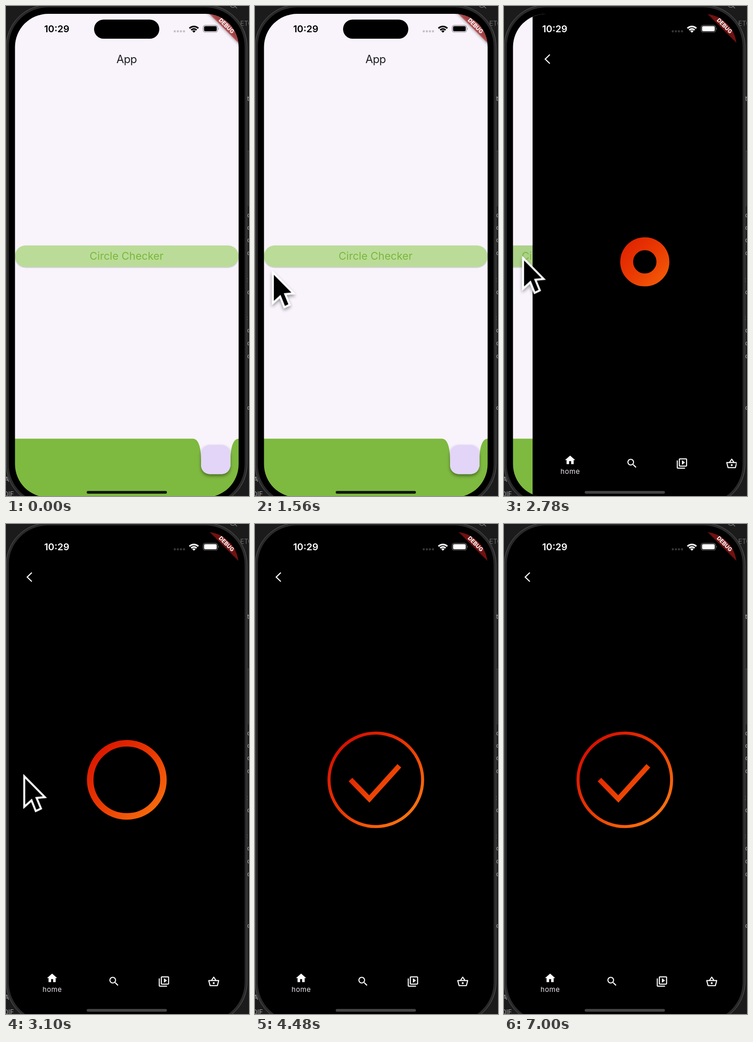
Write an HTML page that moves like this. It is 527 px wide and 1064 px high and loops after 7.02 s.

```html
<!DOCTYPE html>
<html lang="en">
<head>
<meta charset="utf-8">
<title>Circle Checker</title>
<style>
  html, body { margin: 0; width: 100%; height: 100%; overflow: hidden; background: #1b1b1b; }
  svg { display: block; width: 100vw; height: 100vh; }
  text { font-family: Inter, Roboto, sans-serif; }
  .mid { text-anchor: middle; }
  .code { font: 14px "Noto Sans Mono", monospace; fill: #a5a5a5; }

  /* Percentages are milliseconds / 70.2 */
  .anim { animation: 7020ms linear infinite; }

  .under { animation-name: under; }
  @keyframes under {
    0%, 36.18% { transform: none; opacity: 1; animation-timing-function: cubic-bezier(.35, .91, .33, .97); }
    43.3% { transform: translateX(-157px); opacity: 1; animation-timing-function: step-start; }
    43.4%, 100% { transform: translateX(-157px); opacity: 0; }
  }
  .over { animation-name: over; }
  @keyframes over {
    0%, 36.18% { transform: translateX(487px); animation-timing-function: cubic-bezier(.35, .91, .33, .97); }
    43.3%, 100% { transform: none; }
  }
  .status { animation-name: status; animation-timing-function: step-end; }
  @keyframes status { 0% { color: #000; } 37.32% { color: #fff; } }
  .signal { animation-name: signal; animation-timing-function: step-end; }
  @keyframes signal { 0% { fill: #c5c0c8; } 37.32% { fill: #363636; } }
  .homebar { animation-name: homebar; animation-timing-function: step-end; }
  @keyframes homebar { 0% { fill: #11180b; } 37.32% { fill: #444; } }

  .cursor { animation-name: cursor; }
  @keyframes cursor {
    0%, 7.98% { transform: translate(-110px, 22px); animation-timing-function: ease-out; }
    11.8%, 16% { transform: none; animation-timing-function: ease-in-out; }
    30%, 43.87% { transform: translate(4.5px, -52.5px); animation-timing-function: ease-in; }
    47%, 100% { transform: translate(-110px, -30px); }
  }
  .press { animation-name: press; }
  @keyframes press {
    0%, 34.3% { opacity: 0; }
    35.4%, 39.6% { opacity: 1; }
    42%, 100% { opacity: 0; }
  }
  .ripple { animation-name: ripple; }
  @keyframes ripple {
    0%, 34.47% { r: 0px; opacity: 1; }
    35.9% { r: 121px; }
    39.3% { r: 470px; opacity: 1; }
    42% { r: 470px; opacity: 0; }
    100% { r: 0px; opacity: 0; }
  }
  .ring { animation-name: ring; }
  @keyframes ring {
    0%, 36.18% { r: 0px; stroke-width: 41.5px; animation-timing-function: cubic-bezier(0, 0, .58, 1); }
    49.57%, 100% { r: 101.5px; stroke-width: 6.6px; }
  }
  .check { stroke-dasharray: 1 2; animation-name: check; }
  @keyframes check {
    0%, 52.5% { stroke-dashoffset: 1.01; animation-timing-function: ease-out; }
    62.5%, 100% { stroke-dashoffset: 0; }
  }
</style>
</head>
<body>
<svg viewBox="0 0 527 1064" preserveAspectRatio="none">
  <defs>
    <clipPath id="screen"><rect x="19.500" y="17" width="485" height="1050" rx="72"/></clipPath>
    <clipPath id="pill"><rect x="19.500" y="520" width="485" height="46.500" rx="23.200"/></clipPath>
    <linearGradient id="fire" gradientUnits="userSpaceOnUse" x1="157" y1="450" x2="367" y2="660">
      <stop offset="0" stop-color="#d00000"/>
      <stop offset=".5" stop-color="#ea3a02"/>
      <stop offset="1" stop-color="#ff8812"/>
    </linearGradient>
    <filter id="soft" x="-10%" y="-100%" width="120%" height="300%"><feGaussianBlur stdDeviation="3.8"/></filter>
    <filter id="lift" x="-30%" y="-30%" width="160%" height="170%">
      <feDropShadow dx="0" dy="4" stdDeviation="3.5" flood-opacity=".4"/>
    </filter>
    <filter id="low" x="-5%" y="-20%" width="110%" height="160%">
      <feDropShadow dx="0" dy="1.2" stdDeviation="1.2" flood-opacity=".3"/>
    </filter>
  </defs>

  <!-- desktop behind the phone -->
  <rect width="527" height="1064" fill="#1b1b1b"/>
  <circle cx="492" cy="-3" r="6" fill="none" stroke="#777" stroke-width="1.500"/>
  <path d="M496 0l5 5" stroke="#777" stroke-width="1.500"/>
  <path d="M524 315h3" stroke="#555"/>
  <rect x="524" y="316" width="3" height="119" fill="#2c2c2c"/>
  <text x="508" y="43" font-size="14" fill="#6c6c6c">ETC</text>
  <g class="code">
    <text x="523" y="206">t</text>
    <text x="523" y="459">c</text><text x="523" y="486">c</text>
    <text x="523" y="513">c</text><text x="523" y="541">c</text>
    <text x="521" y="598">;</text><text x="523" y="626">c</text>
    <text x="521" y="682">:</text><text x="523" y="709">c</text>
    <text x="523" y="737">c</text><text x="523" y="765">c</text>
    <text x="523" y="877">c</text>
    <text x="-3" y="1033">A</text><text x="-5" y="1065">DIE</text>
  </g>

  <!-- phone body -->
  <rect x=".5" y="-2.500" width="522.500" height="1088" rx="91" fill="#292929" stroke="#5c5c5c"/>
  <rect x="6" y="3" width="511.500" height="1077" rx="85" fill="#000"/>

  <g clip-path="url(#screen)">
    <g class="anim under">
      <rect x="19" y="16" width="486" height="1051" fill="#f9f3fc"/>
      <text class="mid" x="261.500" y="124" font-size="24" letter-spacing="-.6" fill="#1d1b20">App</text>

      <rect x="19.500" y="520" width="485" height="46.500" rx="23.200" fill="#badc98" filter="url(#low)"/>
      <g clip-path="url(#pill)">
        <rect class="anim press" x="19" y="520" width="486" height="47" fill="#b4d691"/>
        <circle class="anim ripple" cx="41" cy="545" r="0" fill="#acd188"/>
      </g>
      <text class="mid" x="261.500" y="550.500" font-size="23" fill="#7cb73d">Circle Checker</text>

      <path fill="#7eb940" d="M19 939.500H405C418 939.500 423 960 423 985V1000H487V985C487 960 492 939.500 505 939.500V1067H19z"/>
      <rect x="423" y="953" width="63.500" height="63.500" rx="19" fill="#e2d5f7" filter="url(#lift)"/>
    </g>

    <g class="anim over">
      <rect x="19" y="16" width="490" height="1051" fill="#000"/>
      <path d="M56 105.500L46 115.300L56 125" fill="none" stroke="#fff" stroke-width="2.400"/>
      <g fill="none" stroke="url(#fire)">
        <circle class="anim ring" cx="262" cy="555.500" r="0"/>
        <path class="anim check" pathLength="1" stroke-width="11" d="M207 555L248 597L313 525"/>
      </g>
      <g fill="#fff">
        <path transform="translate(100 985.500) scale(1.1) translate(-12 -11.500)" d="M10 20v-6h4v6h5v-8h3L12 3 2 12h3v8z"/>
        <path transform="translate(234 993) scale(1.11) translate(-11.750 -11.750)" d="M15.500 14h-.79l-.28-.27C15.410 12.590 16 11.110 16 9.500 16 5.910 13.090 3 9.500 3S3 5.910 3 9.500 5.910 16 9.500 16c1.610 0 3.090-.59 4.230-1.570l.27.28v.79l5 4.990L20.490 19l-4.990-5zm-6 0C7.010 14 5 11.990 5 9.500S7.010 5 9.500 5 14 7.010 14 9.500 11.990 14 9.500 14z"/>
        <path transform="translate(342.500 993.500) scale(1.12) translate(-12 -12)" d="M4 6H2v14c0 1.100.9 2 2 2h14v-2H4zM20 2H8c-1.100 0-2 .9-2 2v12c0 1.100.9 2 2 2h12c1.100 0 2-.9 2-2V4c0-1.100-.9-2-2-2zm0 14H8V4h12zM12 5.500v9l6-4.500z"/>
        <g transform="translate(450.500 993) scale(1.1) translate(-12 -11.500)">
          <path d="M2.200 10H21.800L19.200 20H4.800zM7.400 10L12 3.200L16.600 10" fill="none" stroke="#fff" stroke-width="2" stroke-linejoin="round"/>
          <circle cx="12" cy="15" r="2"/>
        </g>
        <text class="mid" x="100.300" y="1016" font-size="15" letter-spacing=".6" fill="#eee8f0">home</text>
      </g>
    </g>

    <!-- corner ribbon -->
    <g transform="translate(477.500 42.800) rotate(45)">
      <rect x="-60" y="-7.500" width="120" height="15" opacity=".5" filter="url(#soft)"/>
      <rect x="-60" y="-7.500" width="120" height="15" fill="#b71c1c" opacity=".63"/>
      <text class="mid" x=".8" y="4.200" font-size="11.800" font-weight="800" fill="#fff">DEBUG</text>
    </g>
    <rect class="anim homebar" x="175" y="1053" width="174" height="6" rx="3"/>
  </g>

  <!-- status bar -->
  <rect x="191" y="29.500" width="141.500" height="41.500" rx="20.700" fill="#000"/>
  <g class="anim status" fill="currentColor">
    <text class="mid" x="110" y="57" font-size="20.500" font-weight="600">10:29</text>
    <g class="anim signal">
      <circle cx="366" cy="55" r="2.400"/><circle cx="372.700" cy="55" r="2.400"/>
      <circle cx="379.300" cy="55" r="2.400"/><circle cx="386" cy="55" r="2.400"/>
    </g>
    <path d="M397.900 48.500A13.500 13.500 0 0 1 417.100 48.500M401.700 52.200A8.200 8.200 0 0 1 413.300 52.200" fill="none" stroke="currentColor" stroke-width="3.500"/>
    <path d="M407.500 58L403.900 54.400A5 5 0 0 1 411.100 54.400z"/>
    <rect x="427.500" y="41.800" width="31.500" height="15.200" rx="4.800" fill="none" stroke="currentColor" stroke-width="1.200" opacity=".45"/>
    <rect x="429.500" y="43.800" width="27.500" height="11.200" rx="3"/>
    <path d="M460.500 47q2 2.400 0 4.800z" opacity=".5"/>
  </g>

  <g class="anim cursor">
    <path filter="url(#lift)" d="M39 605L77 643.500L60.500 645L70.500 669L63 672.500L53.500 648.500L39 661.500z"
      stroke="#fff" stroke-width="8.400" stroke-miterlimit="6" paint-order="stroke"/>
  </g>
</svg>
</body>
</html>
```
